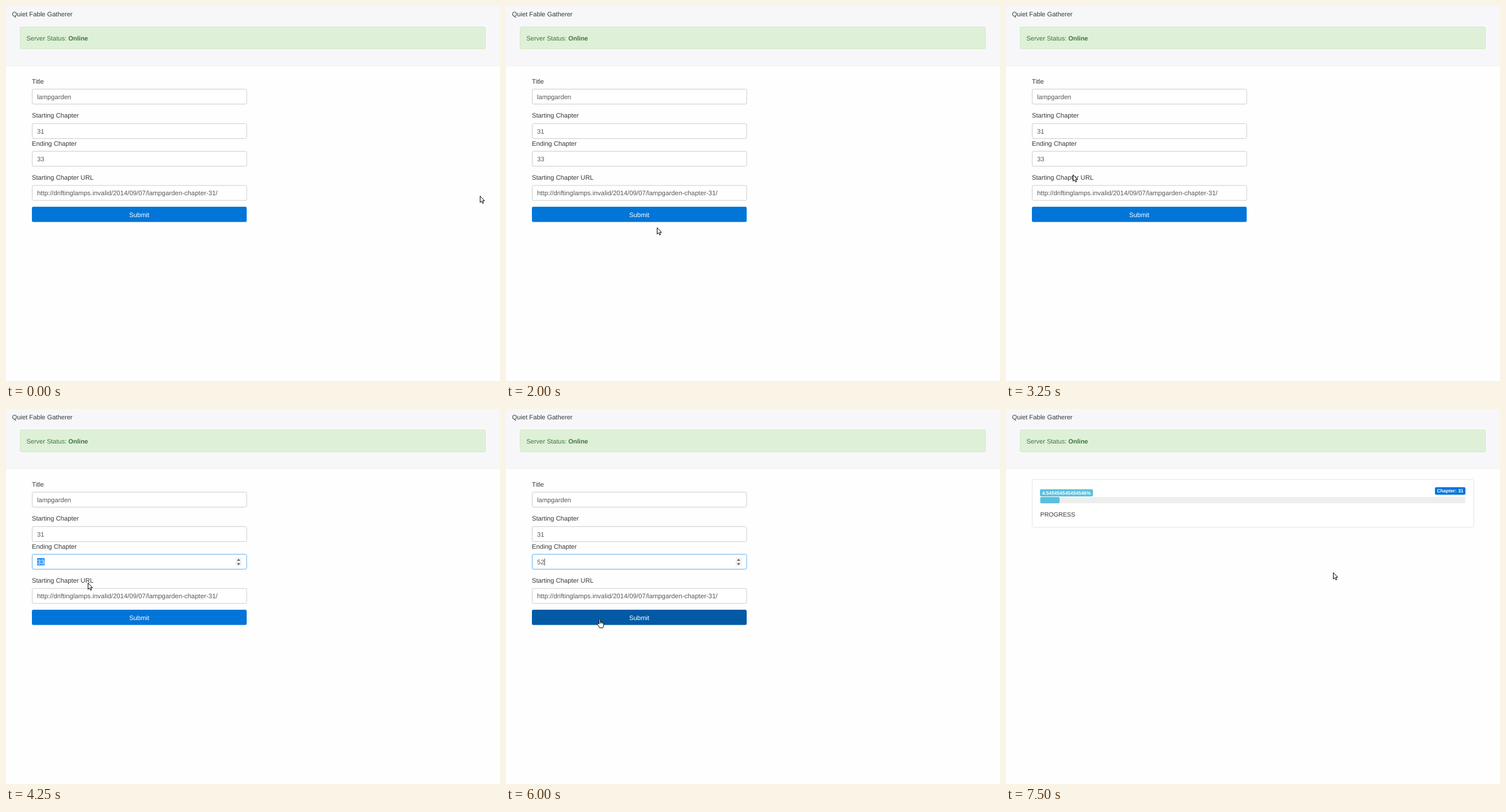
An HTML page that plays this animation: 858x652 px, repeating every 8000 ms.

```html
<!DOCTYPE html>
<html lang="en">
<head>
<meta charset="utf-8">
<title>Chapter form</title>
<style>
  html, body { margin: 0; width: 100%; height: 100%; overflow: hidden; background: #fefefe; }
  svg { display: block; width: 858px; height: 652px; }
  text {
    font: 11.2px "Liberation Sans", Arial, sans-serif;
    fill: #373a3c; white-space: pre; text-rendering: geometricPrecision;
  }
  .value { fill: #55595c; }
  .url { font-size: 11.4px; }
  .status { font-size: 11px; fill: #3c763d; }
  .status tspan, .chip { font-weight: bold; }
  .chip { font-size: 8.4px; fill: #fff; }
  .state { font-size: 10.7px; }
  .field { fill: #fff; stroke: #ccc; }
  .field.focus { stroke: #66afe9; }
</style>
</head>
<body>
<svg id="stage" viewBox="0 0 858 652">
  <rect width="858" height="652" fill="#fefefe"/>
  <rect width="858" height="105" fill="#f7f7f9"/>
  <text x="10.5" y="18">Quiet Fable Gatherer</text>
  <rect x="24.5" y="36.5" width="808" height="38" rx="2.5" fill="#dff0d8" stroke="#d0e9c6"/>
  <text class="status" x="35.5" y="59.5">Server Status: <tspan>Online</tspan></text>

  <g id="form">
    <g id="fields"></g>
    <rect id="selection" x="54" y="259" width="13" height="13" fill="#3297fd"/>
    <text id="ending" class="value" x="54" y="270">33</text>
    <rect id="caret" x="66.5" y="260" width="1" height="12" fill="#373a3c"/>
    <g id="spinner">
      <rect x="399" y="258" width="10" height="15" fill="#efefef"/>
      <path d="M401.3 263.8l2.7-3 2.7 3zM401.3 268.2l2.7 3 2.7-3z" fill="#444"/>
    </g>
    <rect id="button" x="45" y="349" width="373" height="26.5" rx="2.5"/>
    <text x="231.5" y="366.6" text-anchor="middle" style="fill:#fff">Submit</text>
  </g>

  <g id="card">
    <rect x="45.5" y="122.5" width="767" height="83" rx="2.5" fill="#fff" stroke="#e5e5e5"/>
    <rect x="59.5" y="153" width="738.5" height="11" rx="2" fill="#eee"/>
    <g id="progress">
      <rect id="bar" x="59.5" y="153" height="11" rx="2" fill="#5bc0de"/>
      <rect x="59" y="139.5" width="92" height="12.5" rx="2.5" fill="#5bc0de"/>
      <text class="chip" x="105" y="148.8" text-anchor="middle">4.545454545454546%</text>
      <rect x="745" y="136" width="53" height="13" rx="2.5" fill="#0275d8"/>
      <text class="chip" x="771.5" y="145.4" text-anchor="middle">Chapter: 31</text>
      <text class="state" x="59.5" y="187.4">PROGRESS</text>
    </g>
  </g>

  <g id="pointer" stroke-linejoin="round">
    <path id="arrow" d="M.5 .5V11.6L3 9.3L4.9 13.2L6.7 12.3L4.9 8.6H8.2Z" fill="#fff" stroke="#000"/>
    <path id="hand" d="M3.5 9V1.7Q3.5 .5 4.6 .5Q5.7 .5 5.7 1.7V5.2Q7.2 4.5 7.8 5.6Q9.2 5 9.8 6.2Q11.5 5.8 11.5 7.6V10.5Q11.5 13 10 15.5H4.7Q3.8 13.3 1 10Q0 8.5 1.2 7.9Q2.3 7.5 3.5 9ZM5.7 5.2V8M7.8 5.8V8.2M9.8 6.4V8.5" fill="#fff" stroke="#000"/>
    <path id="beam" d="M-2.5 -6.5H-.7L0 -6L.7 -6.5H2.5M0 -6V6M-2.5 6.5H-.7L0 6L.7 6.5H2.5" fill="none" stroke="#000"/>
  </g>
</svg>
<script>
const LOOP = 8000;
const $ = id => document.getElementById(id);
const show = (id, on) => { $(id).style.display = on ? '' : 'none'; };

// label, label baseline, box top, value, extra class
const FIELDS = [
  ['Title', 135, 144.5, 'lampgarden'],
  ['Starting Chapter', 194, 204.5, '31'],
  ['Ending Chapter', 243, 252.5, ''],
  ['Starting Chapter URL', 302, 312, 'http://driftinglamps.invalid/2014/09/07/lampgarden-chapter-31/', 'url']
];
$('fields').innerHTML = FIELDS.map(([label, base, top, value, extra = '']) => `
  <text x="45" y="${base}">${label}</text>
  <rect class="field" x="45.5" y="${top}" width="372.5" height="26" rx="2.5"/>
  <text class="value ${extra}" x="54" y="${top + 17.3}">${value}</text>`).join('');
const endingBox = document.querySelectorAll('.field')[2];

// start time, x, y, shape; each pose holds until the next
const POINTER = [
  [0, 823, 330, 'arrow'], [250, 742, 337, 'arrow'], [500, 526, 350, 'arrow'],
  [750, 356, 355, 'hand'], [1000, 330, 268, 'beam'], [1250, 302, 178, 'arrow'],
  [1500, 276, 80, 'arrow'], [1750, 270, 238, 'arrow'], [2000, 262, 385, 'arrow'],
  [2250, 190, 355, 'hand'], [2500, 130, 300, 'arrow'], [3250, 116, 293, 'arrow'],
  [3500, 76, 266, 'beam'], [3750, 24, 268, 'beam'], [4000, 92, 288, 'arrow'],
  [4250, 142, 302, 'arrow'], [5250, 150, 343, 'arrow'], [5500, 158, 365, 'hand'],
  [6250, 330, 330, 'arrow'], [6500, 568, 284, 'arrow']
];

function render(t) {
  const [, x, y, shape] = POINTER.findLast(p => p[0] <= t);
  $('pointer').setAttribute('transform', `translate(${x} ${y})`);
  for (const id of ['arrow', 'hand', 'beam']) show(id, id === shape);

  const submitted = t >= 6250;
  show('form', !submitted);
  show('card', submitted);

  const focused = t >= 3500;
  const selected = t >= 3750 && t < 4500;
  endingBox.classList.toggle('focus', focused);
  show('spinner', focused);
  show('selection', selected);
  show('caret', focused && !selected);
  $('ending').textContent = t < 4500 ? '33' : t < 4750 ? '5' : '52';
  $('ending').style.fill = selected ? '#fff' : '';
  $('caret').setAttribute('x', t >= 4500 && t < 4750 ? 60.5 : 66.5);
  $('button').setAttribute('fill', shape === 'hand' ? '#025aa5' : '#0275d8');

  show('progress', t >= 7250);
  $('bar').setAttribute('width', t < 7500 ? 17 : 738.5 / 22);
}

function tick() {
  render(performance.now() % LOOP);
  requestAnimationFrame(tick);
}
tick();
</script>
</body>
</html>
```
